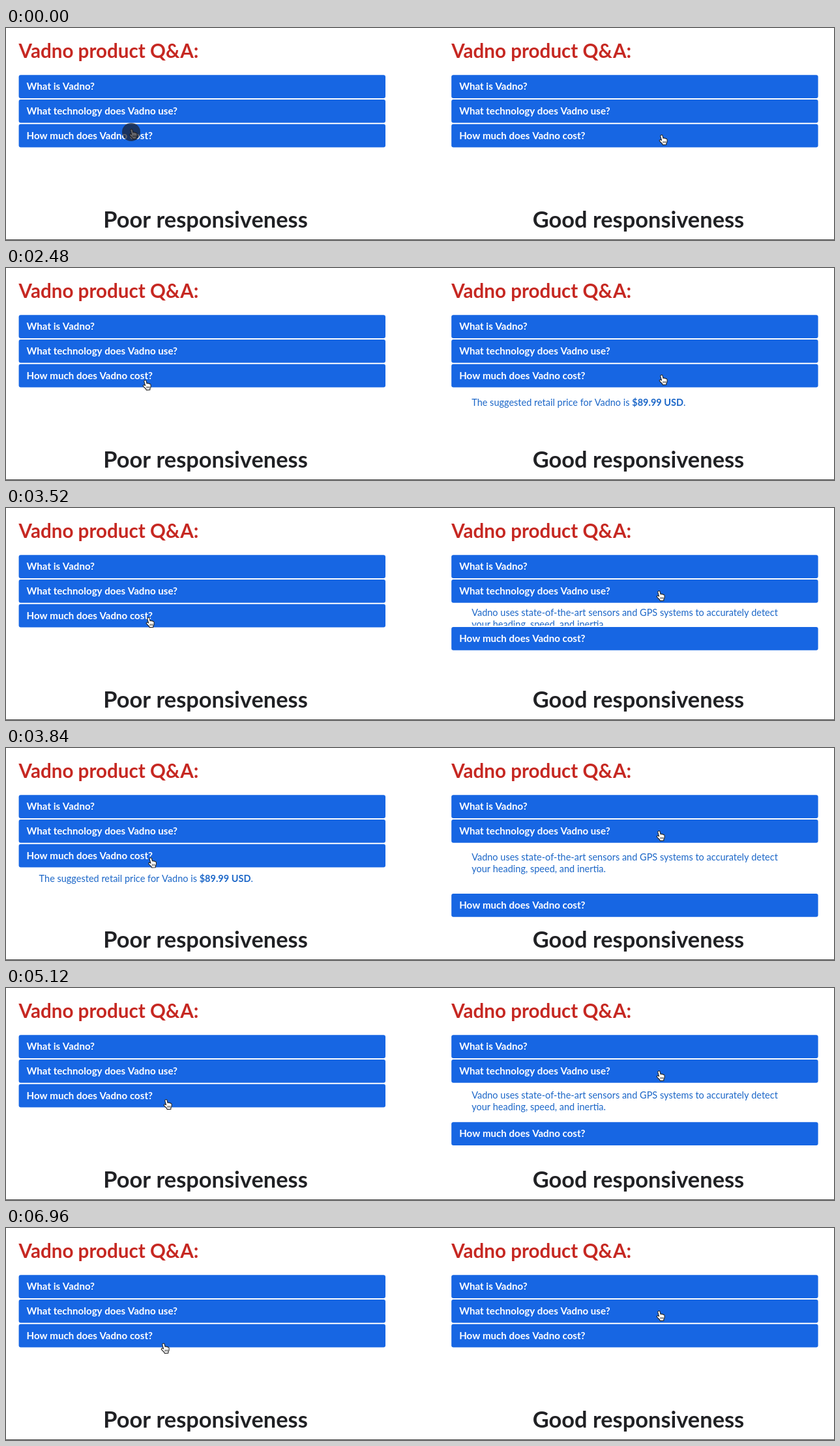
Recreate the animation shown at these times as an HTML page with a canvas. Size 1270 px wide and 326 px high, loop 7.04 s.

```html
<!DOCTYPE html>
<html lang="en">
<head>
<meta charset="utf-8">
<title>Responsiveness comparison</title>
<style>
  html, body { margin: 0; width: 100%; height: 100%; overflow: hidden; background: #fff; }
  canvas { display: block; }
</style>
</head>
<body>
<canvas id="stage" width="1270" height="326"></canvas>
<script>
const ctx = document.getElementById("stage").getContext("2d");
const LOOP = 7040, STEP = 80, TRANSITION = 800;
const BLUE = "#1766e3", RED = "#c62822", LINK = "#1c67c8", INK = "#202124";
const FAMILY = "Lato, 'Open Sans', sans-serif";
const BAR = { width: 562.4, height: 35.7, pitch: 37.7, top: 72.3 };
const QUESTIONS = ["What is Vadno?", "What technology does Vadno use?", "How much does Vadno cost?"];
const ANSWERS = {
  1: {
    height: 83,
    lines: [
      ["Vadno uses state-of-the-art sensors and GPS systems to accurately detect"],
      ["your heading, speed, and inertia."]
    ]
  },
  2: {
    height: 64,
    lines: [["The suggested retail price for Vadno is ", "$89.99 USD", "."]]
  }
};

// Each toggle gives the panel, the opening time and the closing time.
const COLUMNS = [
  {
    x: 19.6, caption: "Poor responsiveness", center: 306,
    toggles: [{ panel: 2, open: 3576, close: 4376 }],
    cursor: [[0, 195, 163], [160, 195, 163], [960, 228, 180], [1360, 228, 180],
             [2240, 216, 180], [2560, 216, 180], [3360, 221, 176], [3680, 221, 176],
             [4400, 248, 179], [5360, 248, 179], [6400, 244, 185]],
    press: { start: 0, end: 240, x: 192, y: 160 }
  },
  {
    x: 683.2, caption: "Good responsiveness", center: 970,
    toggles: [{ panel: 2, open: 400, close: 2490 }, { panel: 1, open: 3314, close: 4960 }],
    cursor: [[0, 1008, 172], [2640, 1008, 172], [3200, 1004, 135]]
  }
];

const clamp = v => Math.max(0, Math.min(1, v));

// cubic-bezier(.25, .1, .25, 1)
function ease(x) {
  if (x <= 0 || x >= 1) return clamp(x);
  const bezier = (a, b, s) => 3 * a * s * (1 - s) ** 2 + 3 * b * s * s * (1 - s) + s ** 3;
  let low = 0, high = 1;
  for (let i = 0; i < 20; i++) {
    const mid = (low + high) / 2;
    if (bezier(0.25, 0.25, mid) < x) low = mid; else high = mid;
  }
  return bezier(0.1, 1, low);
}

function openness(toggles, panel, t) {
  const toggle = toggles.find(item => item.panel === panel);
  if (!toggle) return 0;
  return ease((t - toggle.open) / TRANSITION) - ease((t - toggle.close) / TRANSITION);
}

function cursorAt(path, t) {
  const next = path.findIndex(point => point[0] > t);
  if (next < 0) return path[path.length - 1].slice(1);
  const [t0, x0, y0] = path[next - 1], [t1, x1, y1] = path[next];
  const u = (t - t0) / (t1 - t0), k = u * u * (3 - 2 * u);
  return [x0 + (x1 - x0) * k, y0 + (y1 - y0) * k];
}

function text(value, x, y, size, weight, color, align = "left") {
  ctx.font = `${weight} ${size}px ${FAMILY}`;
  ctx.fillStyle = color;
  ctx.textAlign = align;
  ctx.fillText(value, x, y);
  return ctx.measureText(value).width;
}

function drawBar(x, y, label) {
  ctx.fillStyle = BLUE;
  ctx.beginPath();
  ctx.roundRect(x, y, BAR.width, BAR.height, 3);
  ctx.fill();
  text(label, x + 12, y + 23, 15.1, 700, "#fff");
}

function drawAnswer(x, y, { height, lines }, amount) {
  ctx.save();
  ctx.beginPath();
  ctx.rect(x, y, BAR.width, height * amount);
  ctx.clip();
  lines.forEach((parts, row) => {
    let left = x + 31;
    parts.forEach((part, i) => {
      left += text(part, left, y + 14.3 + 14 * amount + row * 18.5, 14.5, i === 1 ? 700 : 400, LINK);
    });
  });
  ctx.restore();
}

const hand = new Path2D(
  "M-3.6-7C-2.4-8-1.2-7.4-.9-6.2L0-2.4C.7-3.3 1.8-3 2.1-2.1" +
  "C2.9-2.9 4-2.4 4.2-1.5C5.2-2 6-1.2 6.1-.2L6 3.2L4.8 5.4L4.9 7.4" +
  "L-.9 7.6L-1.4 6L-5.3 2.2C-6.5 1-5.3-.3-4-.2L-2.4.9L-4.1-5.1C-4.3-5.9-4.2-6.6-3.6-7Z"
);

function drawCursor([x, y]) {
  ctx.save();
  ctx.translate(x, y);
  ctx.fillStyle = "#fff";
  ctx.strokeStyle = "#222";
  ctx.lineWidth = 1.1;
  ctx.lineJoin = "round";
  ctx.fill(hand);
  ctx.stroke(hand);
  ctx.lineWidth = 0.8;
  ctx.beginPath();
  for (const fold of [0, 1.9, 3.8]) {
    ctx.moveTo(fold, 2);
    ctx.lineTo(fold, 5);
  }
  ctx.stroke();
  ctx.restore();
}

function drawPress({ start, end, x, y }, t) {
  if (t < start || t >= end) return;
  ctx.fillStyle = `rgba(28, 28, 36, ${0.68 * (1 - (t - start) / (end - start))})`;
  ctx.beginPath();
  ctx.arc(x, y, 14, 0, Math.PI * 2);
  ctx.fill();
}

function drawColumn(column, t) {
  const { x, caption, center, toggles, cursor, press } = column;
  text("Vadno product Q&A:", x, 45.5, 29.6, 700, RED);
  let shift = 0;
  QUESTIONS.forEach((question, i) => {
    const y = BAR.top + i * BAR.pitch + shift;
    drawBar(x, y, question);
    const amount = openness(toggles, i, t);
    if (amount > 0) {
      drawAnswer(x, y + BAR.height, ANSWERS[i], amount);
      shift += ANSWERS[i].height * amount;
    }
  });
  text(caption, center, 306.5, 34.4, 700, INK, "center");
  drawCursor(cursorAt(cursor, t));
  if (press) drawPress(press, t);
}

function frame() {
  const t = Math.floor((performance.now() % LOOP) / STEP) * STEP;
  ctx.fillStyle = "#fff";
  ctx.fillRect(0, 0, 1270, 326);
  COLUMNS.forEach(column => drawColumn(column, t));
  ctx.fillStyle = "#4c4c4c";
  ctx.fillRect(0, 325, 1270, 1);
  requestAnimationFrame(frame);
}
frame();
</script>
</body>
</html>
```
